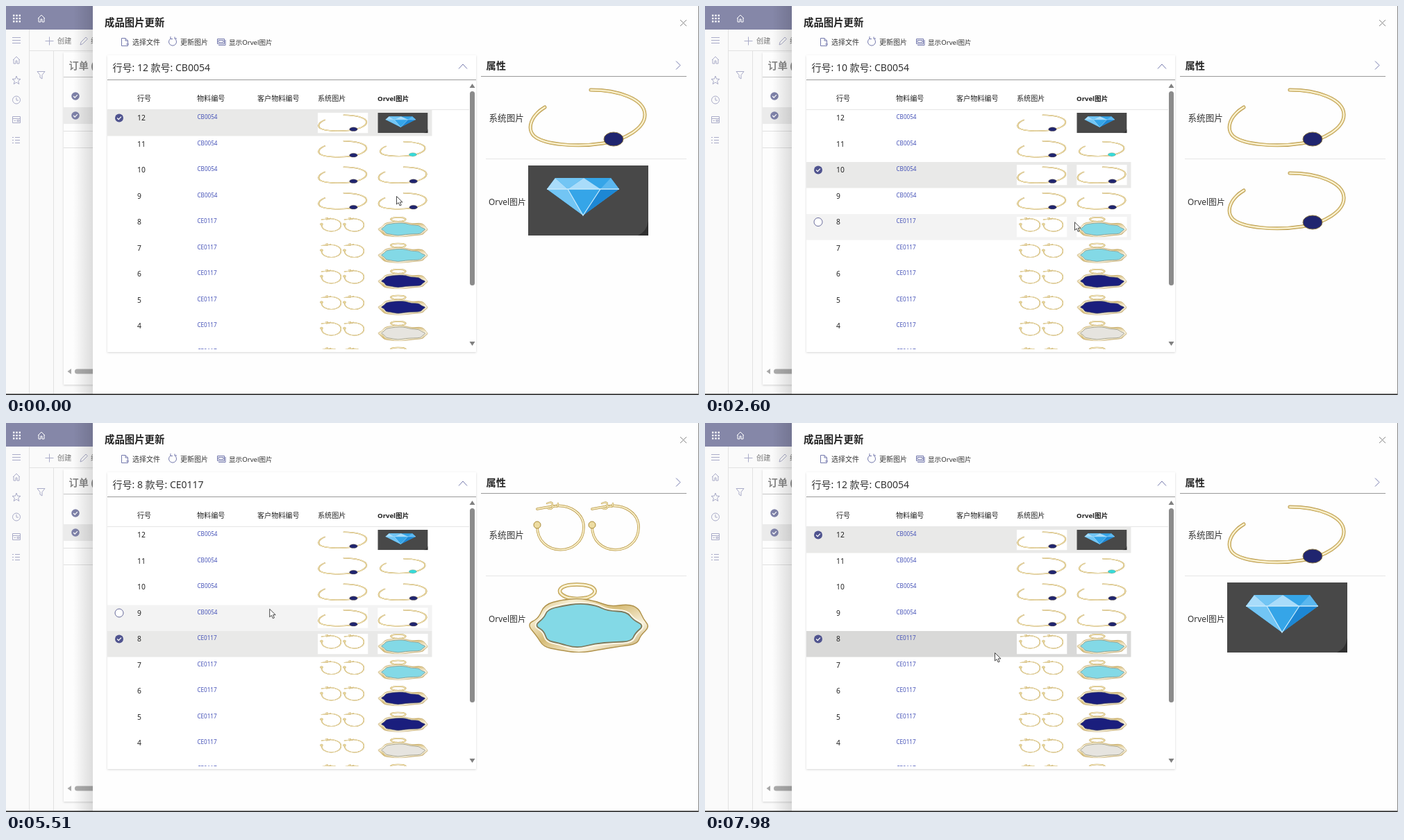
Write an HTML page that moves like this. It is 998x561 px and loops after 8 s.

```html
<!DOCTYPE html>
<html lang="zh">
<head>
<meta charset="utf-8">
<style>
  html, body { margin: 0; width: 100%; height: 100%; overflow: hidden; background: #fff; }
  svg { display: block; }
  #stage { width: 998px; height: 561px; font-family: 'Noto Sans', 'Noto Sans CJK SC', 'Noto Sans CJK', sans-serif; }
  .line { fill: none; stroke: #7479ad; stroke-width: 1; }
  .side .line { stroke: #a9abc8; }
  .gold path { fill: none; stroke-linecap: round; }
</style>
</head>
<body>
<svg id="stage" viewBox="0 0 998 561">
  <defs>
    <linearGradient id="shade"><stop offset="0" stop-color="#000" stop-opacity="0"/><stop offset="1" stop-color="#000" stop-opacity=".13"/></linearGradient>
    <linearGradient id="metal" x2="1" y2="1">
      <stop offset="0" stop-color="#c9ac62"/><stop offset=".2" stop-color="#f7eed2"/><stop offset=".45" stop-color="#d6bc78"/>
      <stop offset=".7" stop-color="#f8f1dc"/><stop offset="1" stop-color="#b99a50"/>
    </linearGradient>
    <filter id="soft" x="-10%" y="-10%" width="120%" height="120%"><feDropShadow dx="0" dy="1" stdDeviation="1.5" flood-opacity=".16"/></filter>
    <clipPath id="list"><path d="M146 107H667V495H146Z"/></clipPath>
  </defs>
  <g id="scene"></g>
</svg>
<script>
const LOOP = 8000, FADE = 400, ROW_H = 37.5, TOP = 150;

const text = (x, y, size, label, fill = '#333', extra = '') =>
  `<text x="${x}" y="${y}" font-size="${size}" fill="${fill}" ${extra}>${label}</text>`;
const rect = (x, y, w, h, fill, extra = '') =>
  `<rect x="${x}" y="${y}" width="${w}" height="${h}" fill="${fill}" ${extra}/>`;
const icon = (d, extra = '') => `<path class="line" d="${d}" ${extra}/>`;
const picture = (id, x, y, w, h, extra = '') =>
  `<use href="#${id}" x="${x}" y="${y}" width="${w}" height="${h}" ${extra}/>`;
const symbol = (id, body) =>
  `<symbol id="${id}" viewBox="0 0 173 101" preserveAspectRatio="none">${body}</symbol>`;
const tick = (x, y, r, fill) =>
  `<circle cx="${x}" cy="${y}" r="${r}" fill="${fill}"/>
   <path d="M${x - 2.8} ${y}l2 2.1l3.7 -4" fill="none" stroke="#fff" stroke-width="1.3"/>`;

// Closed outline that rounds the corners of a point list
function smooth(list) {
  const points = list.split(' ').map(p => p.split(',').map(Number));
  const mid = i => {
    const [a, b] = [points[i], points[(i + 1) % points.length]];
    return `${(a[0] + b[0]) / 2} ${(a[1] + b[1]) / 2}`;
  };
  return `M${mid(points.length - 1)}` + points.map((p, i) => `Q${p[0]} ${p[1]} ${mid(i)}`).join('') + 'Z';
}

// Jewellery pictures
const wire = (d, w) => `<g class="gold"><path d="${d}" stroke="#b3944a" stroke-width="${w}"/>
  <path d="${d}" stroke="#dfc880" stroke-width="${w * .75}"/><path d="${d}" stroke="#fdf7e0" stroke-width="${w * .32}"/></g>`;
const bangle = stone => wire('M24 36C4 48 -2 66 8 77C22 90 70 94 108 88C140 83 169 66 168 46C167 24 130 11 90 11', 5) +
  `<ellipse cx="123" cy="82" rx="14" ry="10" fill="${stone}" stroke="#8d7a45"/>`;
const hoop = x => `<g transform="translate(${x})">` +
  wire('M13 38C12 84 80 84 80 40C80 22 62 6 35 10L13 14', 3.6) +
  wire('M27 6Q37 2 34 9Q43 14 43 6M28 13Q34 16 36 10', 2.4) +
  `<circle cx="13" cy="37" r="5" fill="#eddca2" stroke="#a98a38"/></g>`;

const slab = smooth('-2,60 15,52 23,32 48,25 74,23 98,27 118,35 144,31 159,37 166,53 175,64 162,76 157,89 133,92 108,96 74,102 43,97 22,93 13,78');
const gemFace = smooth('9,62 23,51 28,39 48,34 74,30 98,33 114,41 142,42 151,54 167,62 154,73 149,85 123,86 96,88 70,95 43,87 27,84 23,70');
const pendant = stone => wire('M58 22C38 16 42 3 70 3C99 3 104 16 84 22Q70 25 58 22', 5.5) +
  `<path d="${slab}" fill="url(#metal)" stroke="#b0924a" stroke-width="1.4"/>
   <path d="${gemFace}" fill="none" stroke="#fbf6e6" stroke-width="6"/>
   <path d="${gemFace}" fill="${stone}" stroke="#7d7a5c" stroke-width="1.8"/>`;
const diamond = rect(0, 0, 173, 101, '#484848') +
  `<path d="M173 80Q171 95 158 101H173Z" fill="#303030"/>
   <path d="M39 18H119L131 34L79 72L27 34Z" fill="#35a5e8"/>
   <path d="M39 18L27 34H57ZM80 18L57 34H104Z" fill="#a9dcfa"/>
   <path d="M39 18H80L57 34ZM27 34H57L79 72Z" fill="#72c5f4"/>
   <path d="M119 18L104 34H131Z" fill="#5bb7ef"/><path d="M104 34H131L79 72Z" fill="#1d87d4"/>
   <path d="M27 34H131M57 34L79 72L104 34" fill="none" stroke="#c5e9fc" stroke-width="1.3"/>`;
const pictures = {
  lapis: bangle('#20256f'),
  aqua: `<g transform="translate(6 5) scale(.935 .9)">${bangle('#36dada')}</g>`,
  hoops: hoop(0) + hoop(79),
  teal: pendant('#83d9e6'),
  navy: pendant('#1a1e7d'),
  pearl: pendant('#e6e4df'),
  gem: diamond
};

const rows = [
  [12, 'CB0054', 'lapis', 'gem'], [11, 'CB0054', 'lapis', 'aqua'],
  [10, 'CB0054', 'lapis', 'lapis'], [9, 'CB0054', 'lapis', 'lapis'],
  [8, 'CE0117', 'hoops', 'teal'], [7, 'CE0117', 'hoops', 'teal'],
  [6, 'CE0117', 'hoops', 'navy'], [5, 'CE0117', 'hoops', 'navy'],
  [4, 'CE0117', 'hoops', 'pearl'], [3, 'CE0117', 'hoops', 'pearl']
].map(([no, code, system, sheet]) => ({ no, code, system, sheet }));

const drawRow = (r, i) => {
  const y = TOP + i * ROW_H;
  return rect(146, y, 467.5, ROW_H, 'none', 'class="band"') +
    `<g class="on">${tick(163, y + 11.5, 6, '#50548f')}</g>
     <circle class="ring" cx="163" cy="${y + 11.5}" r="6" fill="#fff" stroke="#66699a"/>` +
    text(189, y + 15.3, 10.3, r.no, '#222') + text(275.5, y + 13, 8.1, r.code, '#4653b8') +
    rect(449, y + 4, 72.3, 29.2, '#fff') + rect(535.3, y + 4, 72.3, 29.2, '#fff') +
    picture(r.system, 449, y + 4, 72.3, 29.2) + picture(r.sheet, 535.3, y + 4, 72.3, 29.2);
};

const house = (x, y) => `M${x - 5} ${y}L${x} ${y - 5}L${x + 5} ${y}M${x - 4} ${y - 1}V${y + 5}H${x - 1}V${y + 1}H${x + 1}V${y + 5}H${x + 4}V${y - 1}`;
const dots = [0, 1, 2].flatMap(i => [0, 1, 2].map(j => rect(10 + i * 4.3, 12.5 + j * 4.3, 2.4, 2.4, '#fff'))).join('');

const backdrop = `<g class="side">` +
  rect(0, 0, 998, 561, '#fafafa') + rect(0, 0, 125, 34, '#8587a8') + dots +
  icon(house(51, 18), 'style="stroke:#fff"') +
  icon('M33.5 34V559M68.5 64V559M33 64.5H125', 'style="stroke:#e2e2e2"') +
  icon('M9 45.5H21M9 49.5H21M9 53.5H21') + icon(house(15, 78)) +
  icon('M15 101L16.6 105.2L21 105.4L17.6 108.2L18.8 112.6L15 110.1L11.2 112.6L12.4 108.2L9 105.4L13.4 105.2Z') +
  '<circle class="line" cx="15" cy="135.5" r="5.5"/>' + icon('M15 132V136H18') +
  icon('M9.5 159.5H20.5V168.5H9.5ZM9.5 162.5H20.5M11.5 165.5H14M16 164.5H19V166.5H16Z') +
  icon('M9 189.5H11M13 189.5H20M9 193.5H11M13 193.5H20M9 197.5H11M13 197.5H20') +
  icon('M56.5 50.5H68.5M62.5 44.5V56.5') + text(74, 54, 10.2, '创建', '#777') +
  icon('M107 56L108 52L115 45L117.5 47.5L110.5 54.5Z') + text(122, 54, 10.2, '编', '#777') +
  icon('M45 94.5H56L52 99.5V105L49 103V99.5Z') +
  rect(83, 67, 60, 479, '#fdfdfd', 'filter="url(#soft)"') +
  text(90.5, 90.5, 14.2, '订单 (', '#888', 'font-weight="600"') +
  rect(83, 146, 42, 24, '#ebebeb') +
  icon('M83 102.5H125', 'style="stroke:#c4c4c4"') + icon('M83 180.5H125M83 204.5H125', 'style="stroke:#e0e0e0"') +
  tick(100, 130, 5.8, '#7e81a8') + tick(100, 158, 5.8, '#7e81a8') +
  '<path d="M94 523V531L88.5 527Z" fill="#a8a8a8"/>' + rect(99, 523.5, 40, 7, '#adadad', 'rx="3.5"') +
  rect(97, 0, 28, 561, 'url(#shade)') + '</g>';

const panel = rect(125, 0, 873, 561, '#fefefe') +
  text(142, 28.5, 14.4, '成品图片更新', '#222', 'font-weight="600"') +
  icon('M971 20L980 29M980 20L971 29', 'style="stroke:#888"') +
  icon('M166.5 46.5H172L175.5 50V57.5H166.5ZM172 46.5V50H175.5M173 55H177') + text(182, 55.5, 10, '选择文件') +
  icon('M237 47A5.5 5.5 0 1 0 243 47M237 44V47.5H240M243 44.5V47H246') + text(251, 55.5, 10, '更新图片') +
  icon('M304.5 47.5H314.5V54.5H304.5ZM306 49.5H313V52.5H306ZM306 56.5H316V49') + text(321, 55.5, 9.6, '显示Orvel图片') +
  rect(146, 71, 531, 428, '#fff', 'rx="1" filter="url(#soft)"') +
  text(153.5, 94, 14, '', '#333', 'id="caption" font-weight="500"') +
  icon('M652 90.5L658 84L664 90.5') + icon('M146 106.5H677', 'style="stroke:#999"') +
  [[189, '行号'], [275, '物料编号'], [362, '客户物料编号'], [449, '系统图片']].map(([x, s]) => text(x, 137, 10.1, s, '#222')).join('') +
  text(535, 137, 9.6, 'Orvel图片', '#222', 'font-weight="600"') +
  icon('M146 149.5H667', 'style="stroke:#e6e6e6"') +
  `<g id="rows" clip-path="url(#list)">${rows.map((r, i) => `<g>${drawRow(r, i)}</g>`).join('')}</g>` +
  rect(668, 123, 7, 280, '#8b8b8b', 'rx="3.5"') +
  '<path d="M667.5 118L671.5 112L675.5 118ZM667.5 484H675.5L671.5 490Z" fill="#808080"/>' +
  text(691.5, 91, 14.2, '属性', '#222', 'font-weight="600"') + icon('M965 79.5L971 85.5L965 91.5') +
  icon('M684 101.5H980', 'style="stroke:#999"') + icon('M691 220.5H980', 'style="stroke:#e6e6e6"') +
  text(695.5, 165.5, 12.6, '系统图片') + text(695, 286.5, 11.9, 'Orvel图片') +
  picture('lapis', 752, 110, 173, 101, 'id="systemView"') + picture('gem', 752, 230, 173, 101, 'id="sheetView"') +
  rect(0, 559.3, 998, 2, '#333') + rect(997, 0, 1, 561, '#888') +
  '<circle id="pulse" r="9" fill="#f5ee2e" opacity=".75"/>' +
  '<path id="pointer" d="M.5 .5V12L3.2 9.6L5.2 14L7.2 13.1L5.3 8.9H9Z" fill="#fff" stroke="#333" stroke-width=".9"/>';

const $ = id => document.getElementById(id);
$('scene').innerHTML = Object.entries(pictures).map(([id, body]) => symbol(id, body)).join('') + backdrop + panel;

// time, x, y
const path = [
  [0, 562, 274], [370, 562, 274], [700, 530, 200], [1310, 530, 200], [1490, 531, 252], [1800, 531, 252],
  [1990, 531, 264], [2300, 531, 264], [2650, 532, 314], [3180, 532, 314], [3510, 519, 358], [4440, 519, 358],
  [4790, 86, 352], [5100, 430, 293], [5290, 430, 293], [6080, 164, 161], [6140, 164, 161], [6200, 166, 161],
  [7710, 166, 161], [7980, 417, 331], [LOOP, 417, 331]
];
// time, row shown in detail
const clicks = [[-1000, 12], [770, 11], [1740, 10], [2790, 8], [6420, 12]];
const selections = [[0, [12]], [770, [11]], [1740, [10]], [2790, [8]], [6480, [8, 12]]];

const lastAt = (steps, t) => steps.findLastIndex(s => s[0] <= t);
const clamp = v => Math.min(1, Math.max(0, v));

function pointerAt(t) {
  const i = Math.min(lastAt(path, t), path.length - 2);
  const [a, x0, y0] = path[i], [b, x1, y1] = path[i + 1];
  const p = (t - a) / (b - a), e = p * p * (3 - 2 * p);
  return [x0 + (x1 - x0) * e, y0 + (y1 - y0) * e];
}

function show(view, name, opacity) {
  view.setAttribute('href', '#' + name);
  view.setAttribute('opacity', opacity);
}

const rowParts = [...$('rows').children].map(g => ['.band', '.on', '.ring'].map(s => g.querySelector(s)));
const rowOf = no => rows.find(r => r.no === no);

function render(t) {
  const [x, y] = pointerAt(t);
  $('pointer').setAttribute('transform', `translate(${x} ${y})`);

  const inside = t >= 70 && x > 146 && x < 613;
  const hovered = inside ? Math.floor((y - 4 - TOP) / ROW_H) : -1;
  const selected = selections[lastAt(selections, t)][1];
  rowParts.forEach(([band, on, ring], i) => {
    const isOn = selected.includes(rows[i].no), isOver = hovered === i;
    band.setAttribute('fill', isOn ? (isOver ? '#d9d9d8' : '#e9e9e8') : isOver ? '#f3f3f3' : 'none');
    on.setAttribute('visibility', isOn ? 'visible' : 'hidden');
    ring.setAttribute('visibility', isOver && !isOn ? 'visible' : 'hidden');
  });

  const k = lastAt(clicks, t), [start, no] = clicks[k];
  const now = rowOf(no), before = rowOf(clicks[Math.max(0, k - 1)][1]);
  const fade = clamp((t - start + 50) / FADE);
  $('caption').textContent = `行号: ${no} 款号: ${now.code}`;
  show($('systemView'), now.system, now.system === before.system ? 1 : fade);
  show($('sheetView'), now.sheet, fade);

  const pulse = $('pulse');
  pulse.setAttribute('cx', x - 1);
  pulse.setAttribute('cy', y + 1);
  pulse.setAttribute('visibility', t - start < 120 ? 'visible' : 'hidden');
}

const origin = performance.now();
function frame() {
  render((performance.now() - origin) % LOOP);
  requestAnimationFrame(frame);
}
render(0);
requestAnimationFrame(frame);
</script>
</body>
</html>
```
